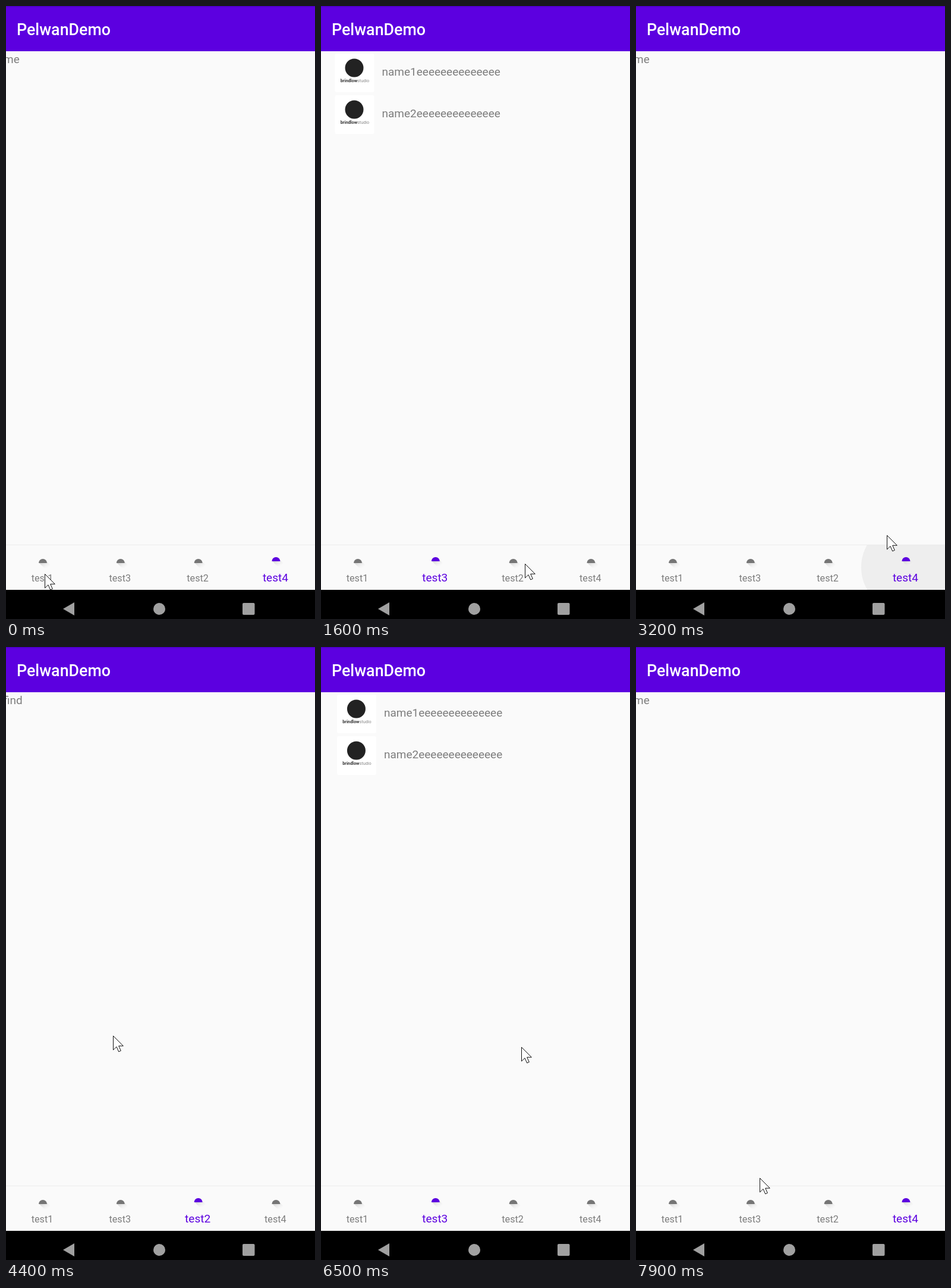
An HTML page for the animation above (8 s loop, 520x1030 px).

```html
<!DOCTYPE html>
<html lang="en">
<head>
<meta charset="utf-8">
<title>Tabbed app demo</title>
<style>
  html, body { margin: 0; width: 100%; height: 100%; overflow: hidden; background: #fafafa; }
  svg { display: block; width: 520px; height: 1030px; font-family: Roboto, "Liberation Sans", sans-serif; }
</style>
</head>
<body>
<svg id="stage" viewBox="0 0 520 1030">
  <defs>
    <clipPath id="barClip"><rect y="906" width="520" height="75"/></clipPath>
    <linearGradient id="shade" x2="1" y2="1">
      <stop offset=".2" stop-color="#d8d8d8"/>
      <stop offset="1" stop-color="#fafafa" stop-opacity="0"/>
    </linearGradient>
  </defs>
  <rect width="520" height="1030" fill="#fafafa"/>
  <g id="pages" font-size="19" fill="#7d7d7d"></g>
  <rect y="905" width="520" height="76" fill="#fafafa"/>
  <rect y="905" width="520" height="1" fill="#ececec"/>
  <g clip-path="url(#barClip)"><circle id="ripple" cy="943" fill="#eee"/></g>
  <g id="tabs" text-anchor="middle"></g>
  <rect width="520" height="76" fill="#5c00e0"/>
  <rect width="520" height="1.5" fill="#4a00c4"/>
  <text x="18" y="49" font-size="26.8" font-weight="500" fill="#fff">PelwanDemo</text>
  <rect y="981" width="520" height="49"/>
  <g fill="#a0a0a0">
    <path d="M96 1013 115 1002V1024Z"/>
    <circle cx="258" cy="1013" r="10"/>
    <rect x="398" y="1003" width="20.5" height="20" rx="2"/>
  </g>
  <path id="cursor" d="M.5 .5V24L6 18.7 9.7 27 13.3 25.4 9.7 17.3H17.3Z" fill="#fff" stroke="#111"/>
</svg>
<script>
const LOOP = 8000, STEP = 100, START_PAGE = 3;
const PAGE_STRIDE = 528;              // the pages reach a little past both stage edges
const DRAG_PX = 130, FLING_MS = 163;
const SCROLL_MS = 300, TAP_DELAY = 50;
const RIPPLE_GROW = 200, RIPPLE_HOLD = 300, RIPPLE_FADE = 300;

const $ = id => document.getElementById(id);
const clamp = v => Math.max(0, Math.min(1, v));
const lerp = (a, b, k) => a + (b - a) * k;
const smooth = k => k * k * (3 - 2 * k);
const settle = k => 1 - (1 - clamp(k)) ** 5;
const tabX = i => 61.5 + i * 130.8;

// A gesture takes effect at `time`, with the pointer at (x, y) and `page` as its result.
// The pointer is in place `lead` ms before and stays `hold` ms after.
const tap = (time, page, x, y) => ({ time, page, x, y, lead: 200, hold: 100, drag: 0 });
const swipe = (time, page, x, y, drag = DRAG_PX) => ({ time, page, x, y, lead: 150, hold: 200, drag });
const move = (time, x, y) => ({ time, x, y, lead: 0, hold: 0, drag: 0 });

const gestures = [
  tap(100, 0, 65, 954),
  tap(1000, 1, 187, 949),
  tap(1800, 2, 343, 937),
  tap(2900, 3, 456, 945),
  move(3200, 422, 889),
  swipe(4200, 2, 180, 653),
  swipe(4700, 1, 230, 656),
  swipe(5100, 0, 248, 660),
  swipe(5800, 0, 297, 655),
  swipe(6400, 1, 337, 672, -DRAG_PX),
  swipe(6800, 2, 337, 674, -DRAG_PX),
  swipe(7250, 3, 320, 680, -DRAG_PX),
  move(7900, 208, 892)
];

function listPage(left, textX, top, pitch) {
  return [0, 1].map(row => `
    <g transform="translate(0 ${top + row * pitch})">
      <rect x="${left}" width="66" height="65" rx="3" fill="#fff"/>
      <circle cx="${left + 32.5}" cy="24" r="15.5" fill="#222"/>
      <text x="${left + 33.5}" y="47.5" font-size="7.3" text-anchor="middle" fill="#333"><tspan
        font-weight="700">brindlow</tspan><tspan fill="#888">studio</tspan></text>
      <text x="${textX}" y="37">name${row + 1}${'e'.repeat(14)}</text>
    </g>`).join('');
}
const textPage = word => `<text x="-4" y="96">${word}</text>`;

const pageContent = [
  listPage(8.5, 101.5, 82, 73),
  listPage(23.5, 102.5, 80, 70),
  textPage('find'),
  textPage('me')
];
$('pages').innerHTML = pageContent.map(c => `<g>${c}</g>`).join('');
$('tabs').innerHTML = ['test1', 'test3', 'test2', 'test4'].map((name, i) => `
  <g>
    <g class="icon">
      <path d="M-6 7 7 5 12 10 8 15 2 15Z" fill="url(#shade)"/>
      <path class="dome" d="M-7 7A7 7 0 0 1 7 7Z"/>
    </g>
    <text x="${tabX(i) - .5}" y="967">${name}</text>
  </g>`).join('');
const pages = [...$('pages').children];
const tabs = [...$('tabs').children].map(g => ({
  icon: g.querySelector('.icon'), dome: g.querySelector('.dome'), label: g.querySelector('text')
}));

function pagerState(t) {
  let page = START_PAGE, selected = START_PAGE;
  for (const { time, page: to, drag, lead } of gestures) {
    if (to === undefined) continue;
    const begin = drag ? time - lead : time + TAP_DELAY;
    if (t < begin) break;
    const pulled = Math.abs(drag) / PAGE_STRIDE * clamp((t - begin) / lead);
    const rest = drag ? settle((t - time) / FLING_MS) : settle((t - begin) / SCROLL_MS);
    page = lerp(selected, to, lerp(pulled, 1, rest));
    if (t >= time) selected = to;
  }
  return { page, selected };
}

function pointerAt(t) {
  let [from] = gestures;
  for (const g of gestures) {
    const arrive = g.time - g.lead, startX = g.x - g.drag;
    if (t < arrive) {
      const leave = from.time + from.hold;
      const k = smooth(clamp((t - leave) / (arrive - leave)));
      return [lerp(from.x, startX, k), lerp(from.y, g.y, k)];
    }
    if (t < g.time) return [lerp(startX, g.x, (t - arrive) / g.lead), g.y];
    from = g;
  }
  return [from.x, from.y];
}

function drawRipple(t) {
  const hit = gestures.find(g => g.page !== undefined && !g.drag
    && t >= g.time && t < g.time + RIPPLE_HOLD + RIPPLE_FADE);
  const age = hit ? t - hit.time : LOOP;
  $('ripple').setAttribute('opacity', 1 - clamp((age - RIPPLE_HOLD) / RIPPLE_FADE));
  $('ripple').setAttribute('r', lerp(25, 75, clamp(age / RIPPLE_GROW)));
  if (hit) $('ripple').setAttribute('cx', tabX(hit.page));
}

function render(t) {
  const { page, selected } = pagerState(t);
  pages.forEach((g, i) => g.setAttribute('transform', `translate(${(i - page) * PAGE_STRIDE} 0)`));
  tabs.forEach(({ icon, dome, label }, i) => {
    const active = i === selected;
    icon.setAttribute('transform', `translate(${tabX(i) + .5} ${active ? 926 : 929})`);
    dome.setAttribute('fill', active ? '#5c00e0' : '#757575');
    label.setAttribute('fill', active ? '#5c00e0' : '#7d7d7d');
    label.setAttribute('font-size', active ? 19 : 16.2);
  });
  drawRipple(t);
  const [x, y] = pointerAt(t);
  $('cursor').setAttribute('transform', `translate(${Math.round(x)} ${Math.round(y)})`);
}

const origin = performance.now();
function tick() {
  const elapsed = (performance.now() - origin) % LOOP;
  render(Math.floor(elapsed / STEP) * STEP);
  requestAnimationFrame(tick);
}
tick();
</script>
</body>
</html>
```
